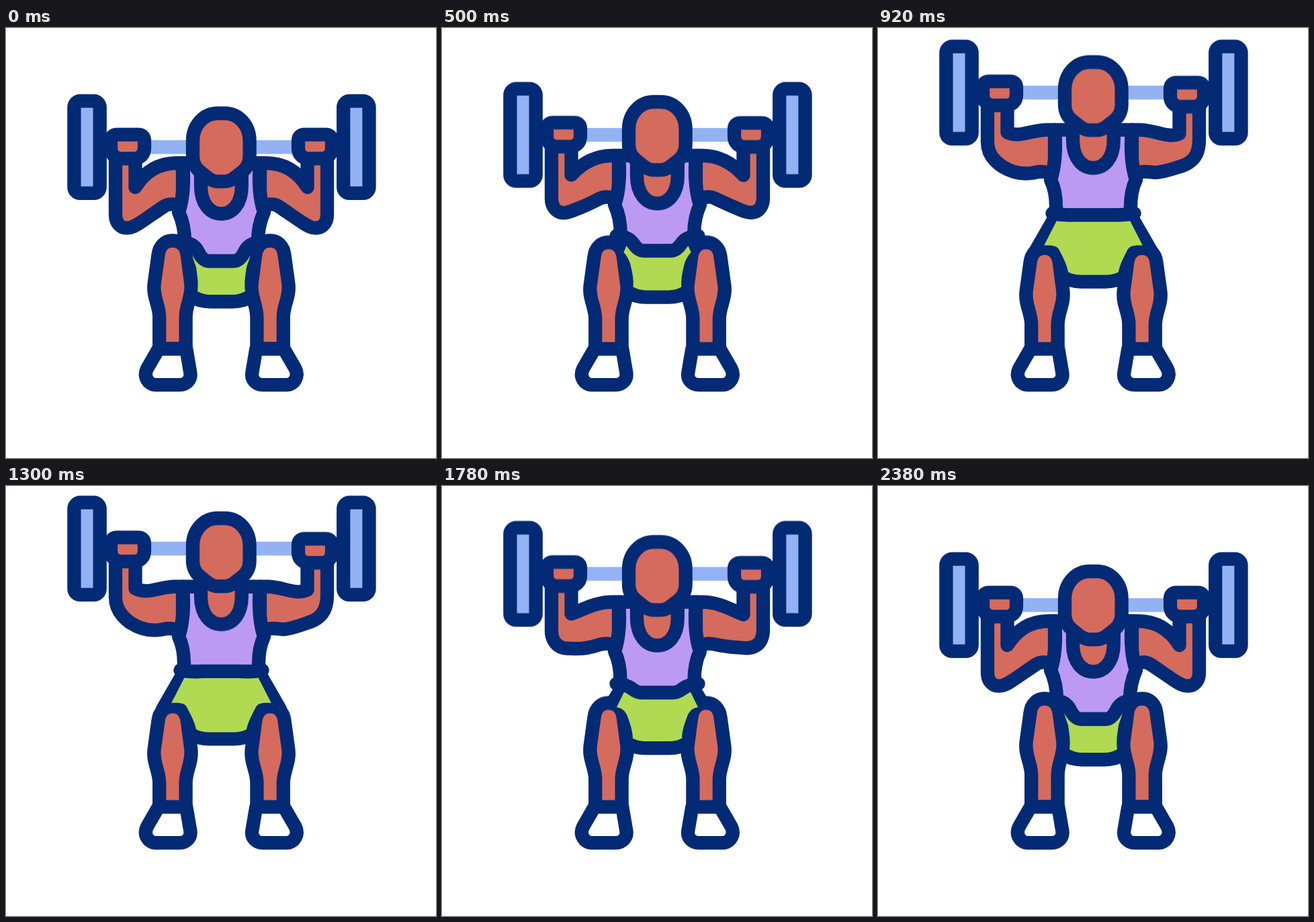
These frames come from a looping animation (640 by 640 pixels, 2.4 s). An HTML page without scripts:

```html
<!DOCTYPE html>
<html lang="en">
<head>
<meta charset="utf-8">
<title>Barbell squat</title>
<style>
  html, body { margin: 0; height: 100%; overflow: hidden; background: #fff; }
  svg { display: block; width: 100%; height: 100%; }

  .line { stroke: #032a75; stroke-width: 20.3; stroke-linejoin: round; stroke-linecap: round; }
  .navy { fill: #032a75; }
  .skin { fill: #d56b5d; }
  .steel { fill: #93b2f4; }
  .shirt { fill: #bc9af3; }
  .green { fill: #b0da52; }
  .white { fill: #fff; }
  .none { fill: none; }
  .neck { stroke-linecap: butt; }

  /* --y: rise at the top of the squat; --a and --b: low and high outline */
  .lift, .morph { animation: lift 2.4s cubic-bezier(.8, 0, .22, 1) infinite; }
  .morph { animation-name: morph; }
  @keyframes lift {
    0%, 99.167%, 100% { transform: translateY(0); }
    49.583% { transform: translateY(var(--y)); }
  }
  @keyframes morph {
    0%, 99.167%, 100% { d: var(--a); }
    49.583% { d: var(--b); }
  }

  .arm { --a: path("M163 190 V278 C163 290 170 297.7 180 297.7 C187 297.7 193 294 200 289.5 C212 281.5 224 273 236 265 C243 261 250 261 263 268 V201 H255 C228 201 207 213 192.5 237 V190 Z"); }
  .arm.left { --b: path("M163 107.5 V165 C163 175 167 185 173 192 C176.5 196 180.5 200 185 203 C198 211.5 214 215.5 228 214 C236 213 243 209 263 216 V149.5 H252 C228 149.5 210 162 192.5 152 V107.5 Z"); }
  .arm.right { --b: path("M163 109.5 V161 C163 173 165 183 171 190 C175 195 181 199 187 201.5 C200 206 214 212 228 213 C236 213 243 209 263 216 V149.5 H252 C228 149.5 210 163 192.5 154 V109.5 Z"); }
  .torso {
    --a: path("M263 201 C265 225 265 250 257 274 C263 287 266 300 266 318 V347 H375 V318 C375 300 378 287 384 274 C376 250 376 225 378 201 Z");
    --b: path("M263 149.5 C265 174 265 199 257 224 C263 236 265 250 265 265 V275.5 H376 V265 C376 250 378 236 384 224 C376 199 376 174 378 149.5 Z");
  }
  .hips {
    --a: path("M270 330 L262 340 L276 400 C284 405 294 407.3 304 407.3 H337 C347 407.3 357 405 365 400 L379 340 L371 330 Z");
    --b: path("M264 278 L233 332 L270 368 C280 373 291 376.3 302 376.3 H339 C350 376.3 361 373 371 368 L408 332 L377 278 Z");
  }
  .shorts {
    --a: path("M277 335 L277 337 C278 342 281 350 283 356 C284 365 287 378 285 392 Q294 397 304 397 H337 Q347 397 356 392 C354 378 357 365 358 356 C360 350 363 342 364 337 L364 335 L335 347 H306 Z");
    --b: path("M267 282 L246 323 C262 322 266 324 269 329 C276 342 281 352 283 362 Q292 366.3 302 366.3 H339 Q349 366.3 358 362 C360 352 365 342 372 329 C375 324 379 322 395 323 L374 282 L345 277 H300 Z");
  }
  .belt {
    --a: path("M259.5 319 C275 319 282 325 286 333 C291 343 296 347 302 347 H339 C345 347 350 343 355 333 C359 325 366 319 381.5 319");
    --b: path("M259.5 274 C268 276 274 276 280 276 C286 276 290 275.5 294 275.5 H347 C351 275.5 355 276 361 276 C367 276 373 276 381.5 274");
  }
</style>
</head>
<body>
<svg viewBox="0 0 640 640">
  <g class="lift" style="--y:-84.5px">
    <rect class="steel" x="145" y="167" width="350" height="20.5"/>
    <g class="line steel">
      <rect x="101.4" y="108.7" width="38.3" height="137.2" rx="9"/>
      <rect x="502.2" y="108.7" width="38.3" height="137.2" rx="9"/>
    </g>
  </g>

  <g class="line skin">
    <path class="morph arm left"/>
    <g class="lift" style="--y:-82.5px">
      <path id="hand" d="M156 168 Q156 158.7 165.5 158.7 H196.5 Q206 158.7 206 168 V179 C206 188 200 194.3 191 194.3 H171 C162 194.3 156 188 156 179 Z"/>
    </g>
    <g transform="matrix(-1 0 0 1 641 0)">
      <path class="morph arm right"/>
      <g class="lift" style="--y:-80.5px"><use href="#hand"/></g>
    </g>
  </g>

  <path class="line navy morph hips"/>
  <path class="line shirt morph torso"/>
  <g class="line skin">
    <path class="lift neck" style="--y:-71px" d="M290 212 V235 C290 262 304 276.5 320.4 276.5 S350.8 262 350.8 235 V212"/>
    <path class="lift" style="--y:-79.5px" d="M278 168 C278 144 295 127 315 127 H325.6 C345.6 127 362.6 144 362.6 168 V190 C362.6 201 358.6 208 352.6 213 L342.6 221 C336.6 226 331.6 228.4 325.6 228.4 H315 C309 228.4 304 226 298 221 L288 213 C282 208 278 201 278 190 Z"/>
  </g>

  <g class="lift line skin" style="--y:11.5px">
    <path id="leg" d="M228.2 477.5 V430 C228.2 412 218 400 220.7 380 L226.5 338 C228 324 237 316.5 248 316.5 S268 324 269.8 338 L275.3 380 C277.5 400 267.6 412 267.6 430 V477.5 Z"/>
    <use href="#leg" transform="matrix(-1 0 0 1 641 0)"/>
  </g>
  <path class="green morph shorts"/>
  <path class="line none morph belt"/>

  <g class="line white">
    <path id="shoe" d="M227 477.6 L210 507 C204 519 212 531.2 223 531.2 H258 C269 531.2 276 523 274.3 513 L268.3 477.6 Z"/>
    <use href="#shoe" transform="matrix(-1 0 0 1 640.6 0)"/>
  </g>
</svg>
</body>
</html>
```
